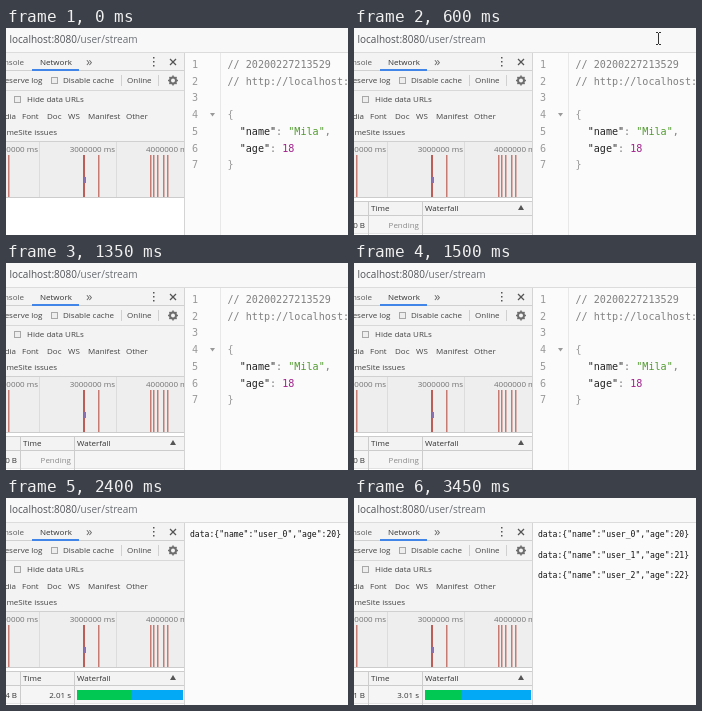
Write an HTML page with a canvas that moves like this. It is 342 by 207 pixels and loops after 3.9 s.

```html
<!DOCTYPE html>
<html lang="en">
<head>
<meta charset="utf-8">
<title>Streaming response</title>
<style>
  html, body { margin: 0; width: 100%; height: 100%; overflow: hidden; background: #fff; }
  canvas { display: block; }
</style>
</head>
<body>
<canvas id="stage" width="342" height="207"></canvas>
<script>
const ctx = document.getElementById('stage').getContext('2d');
const LOOP = 3900;
const UI = '8px "Open Sans", "Noto Sans", sans-serif';
const URL_FONT = '10px "Open Sans", "Noto Sans", sans-serif';
const CODE = '10.1px "DejaVu Sans Mono", monospace';
const PLAIN = '8.1px "DejaVu Sans Mono", monospace';

// Successive states of the request row; `total` is its duration in seconds.
const FIRST_BYTE = 1.02;
const requests = [
  { at: 600, size: '0 B', time: 'Pending' },
  { at: 1650, size: '34 B', time: '1.02 s', total: 1.04 },
  { at: 2400, size: '64 B', time: '2.01 s', total: 2.01 },
  { at: 3450, size: '91 B', time: '3.01 s', total: 3.01 },
];
const messageTimes = [1650, 2550, 3450];

function rect(x, y, w, h, color) {
  ctx.fillStyle = color;
  ctx.fillRect(x, y, w, h);
}

function text(str, x, y, color = '#444', font = UI, align = 'left') {
  ctx.font = font;
  ctx.fillStyle = color;
  ctx.textAlign = align;
  ctx.fillText(str, x, y);
}

const textRight = (str, x, y, color) => text(str, x, y, color, UI, 'right');

function path(points, color, width) {
  ctx.beginPath();
  points.forEach(([x, y]) => ctx.lineTo(x, y));
  if (width) {
    ctx.strokeStyle = color;
    ctx.lineWidth = width;
    ctx.stroke();
  } else {
    ctx.fillStyle = color;
    ctx.fill();
  }
}

// Draws differently coloured pieces of text one after another.
function run(pieces, x, y, font) {
  for (const [str, color] of pieces) {
    text(str, x, y, color, font);
    x += ctx.measureText(str).width;
  }
  return x;
}

function checkbox(x, y) {
  rect(x, y, 7, 7, '#a8a8a8');
  rect(x + 1, y + 1, 5, 5, '#eee');
}

function addressBar(t) {
  const focused = t >= 300 && t < 600;
  rect(0, 0, 342, 24, focused ? '#fff' : '#f8f8f9');
  if (focused) {
    rect(0, 0, 342, 1, '#a9c6ee');
    rect(0, 20, 342, 1, '#b9d1f2');
  }
  rect(0, 24, 342, 1, '#dcdcdc');
  const pathColor = focused ? '#505356' : '#6a6e72';
  const end = run([['localhost:8080', '#505356'], ['/user/stream', pathColor]], 3.5, 15, URL_FONT);
  if (focused) rect(Math.round(end), 5, 1, 12, '#555');
  if (t >= 150 && t < 1350) iBeam(304, 10);
}

function iBeam(x, y) {
  rect(x, y - 5, 1, 11, '#333');
  for (const edge of [-6, 6]) {
    rect(x - 2, y + edge, 2, 1, '#333');
    rect(x + 1, y + edge, 2, 1, '#333');
  }
}

function gear(x, y) {
  ctx.strokeStyle = '#6e6e6e';
  ctx.lineWidth = 2;
  ctx.beginPath();
  ctx.arc(x, y, 3, 0, 2 * Math.PI);
  ctx.stroke();
  for (let i = 0; i < 8; i++) {
    const c = Math.cos(i * Math.PI / 4), s = Math.sin(i * Math.PI / 4);
    path([[x + 3 * c, y + 3 * s], [x + 5 * c, y + 5 * s]], '#6e6e6e', 1.5);
  }
}

function toolbars() {
  rect(0, 25, 178, 89, '#f4f3f4');
  textRight('Console', 18, 37, '#5a5a5a');
  text('Network', 34, 37, '#333');
  text('»', 80, 38, '#666', '13px "Open Sans", sans-serif');
  for (const y of [29, 33, 37]) rect(147, y, 1.5, 1.5, '#555');
  path([[164, 31], [170, 37]], '#555', 1.2);
  path([[170, 31], [164, 37]], '#555', 1.2);
  rect(0, 42, 178, 1, '#d0d0d0');
  rect(26, 41, 47, 2, '#4285e8');

  textRight('Preserve log', 36.5, 55);
  checkbox(45, 49);
  text('Disable cache', 57, 55);
  rect(115, 47, 1, 11, '#d0d0d0');
  text('Online', 121, 55);
  rect(152, 47, 1, 11, '#d0d0d0');
  gear(167, 52.5);
  rect(0, 62, 178, 1, '#d8d8d8');

  checkbox(8, 68);
  text('Hide data URLs', 21, 74);
  textRight('Media', 10, 91);
  [['Font', 16], ['Doc', 41], ['WS', 62], ['Manifest', 82], ['Other', 120]]
    .forEach(([label, x]) => text(label, x, 91));
  textRight('SameSite issues', 51, 107);
  rect(0, 113, 178, 1, '#d0d0d0');
}

function overview() {
  rect(0, 114, 178, 56, '#eeeeee');
  for (const x of [33, 110]) rect(x, 114, 1, 56, '#dcdcdc');
  textRight('2000000 ms', 32, 124, '#707070');
  textRight('3000000 ms', 109, 124, '#707070');
  text('4000000 ms', 140, 124, '#707070');
  for (const x of [2, 92, 144, 147, 151, 157, 161]) rect(x, 127, 1.5, 42, '#c67a72');
  rect(77, 127, 2, 42, '#bd5d58');
  rect(78, 149, 2, 6, '#8c6fb0');
  rect(0, 169, 178, 1, '#ccc');
}

function requestTable(t) {
  rect(0, 170, 178, 37, '#fff');
  const request = requests.findLast(r => t >= r.at);
  if (!request) return;
  rect(0, 173, 178, 15, '#f3f3f3');
  rect(0, 173, 178, 1, '#ccc');
  rect(0, 188, 178, 18, '#f5f5f5');
  rect(0, 187, 178, 1, '#ccc');
  rect(0, 205, 178, 1, '#e2e2e2');
  for (const x of [14, 68]) rect(x, 173, 1, 34, '#ccc');
  text('Time', 17, 183, '#333');
  text('Waterfall', 71, 183, '#333');
  path([[164, 182], [167, 177], [170, 182]], '#555');

  const { size, time, total } = request;
  textRight(size, 11, 200, '#333');
  textRight(time, 65, 200, total ? '#333' : '#8a8a8a');
  if (total) {
    rect(71, 192, 106, 10, '#03a9f4');
    rect(71, 192, Math.round(106 * FIRST_BYTE / total), 10, '#00c853');
  }
}

function jsonView() {
  const gray = '#808080', dark = '#222';
  const lines = [
    [['// 20200227213529', gray]],
    [['// http://localhost:8080', gray]],
    [],
    [['{', '#999']],
    [['  "name"', dark], [': ', gray], ['"Mila"', '#4f9a2c'], [',', gray]],
    [['  "age"', dark], [': ', gray], ['18', '#a0208c']],
    [['}', '#999']],
  ];
  rect(214, 25, 1, 182, '#e8e8e8');
  lines.forEach((pieces, i) => {
    const y = 40 + 16.7 * i;
    text(i + 1, 186, y, '#999', CODE);
    run(pieces, 221.5, y, CODE);
  });
  path([[204, 85], [209, 85], [206.5, 88.5]], '#999');
}

function page(t) {
  rect(178, 25, 164, 182, '#fbfbfb');
  if (t < messageTimes[0]) jsonView();
  messageTimes.forEach((at, i) => {
    if (t >= at) text(`data:{"name":"user_${i}","age":${20 + i}}`, 184, 39 + 20.5 * i, '#111', PLAIN);
  });
  rect(178, 25, 1, 182, '#d4d4d4');
}

function draw(now) {
  const t = now % LOOP;
  toolbars();
  overview();
  requestTable(t);
  page(t);
  addressBar(t);
  requestAnimationFrame(draw);
}
requestAnimationFrame(draw);
</script>
</body>
</html>
```
